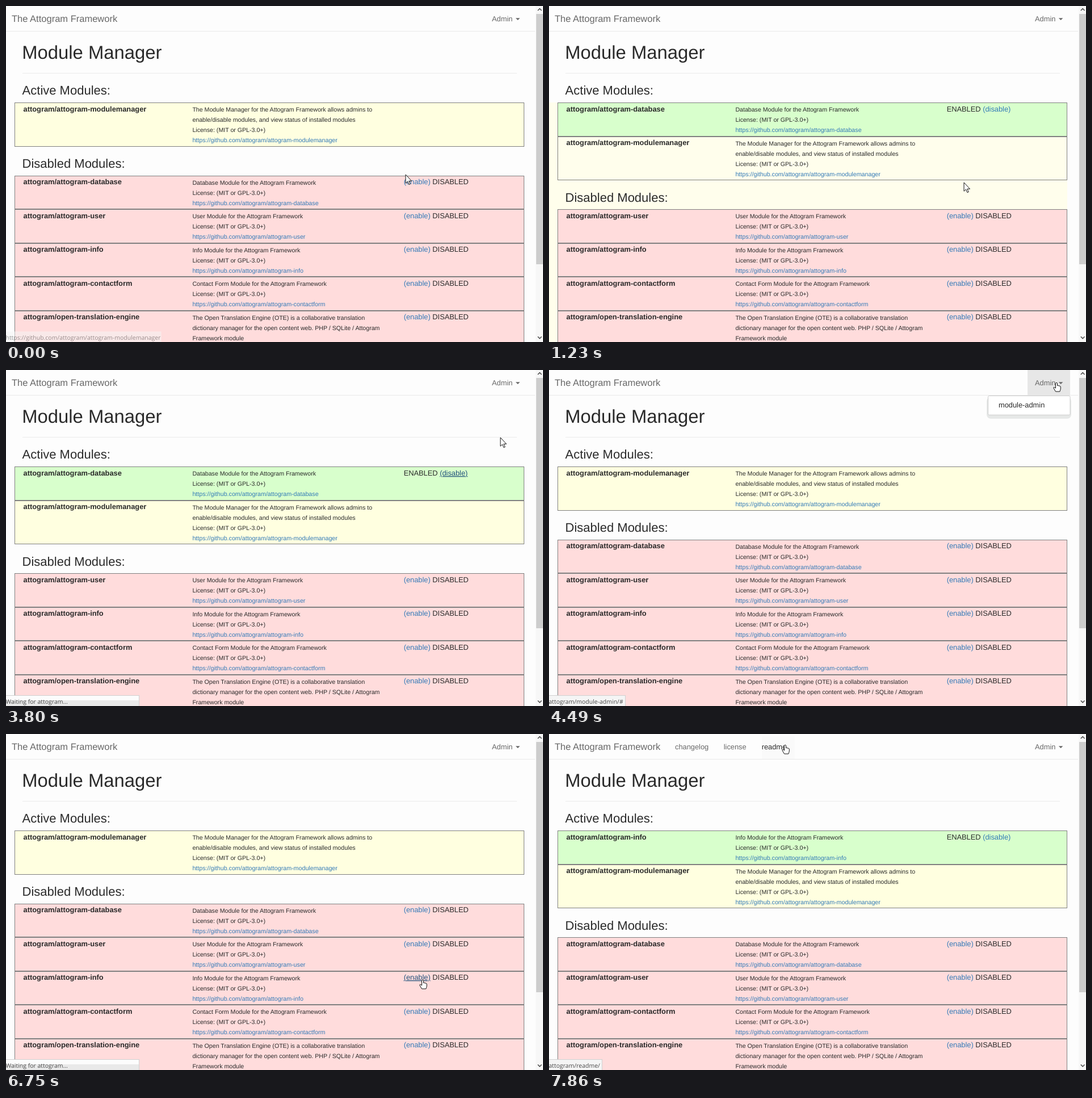
Recreate the animation shown at these times as an HTML page. Size 946 by 592 pixels, loop 8000 ms.

```html
<!DOCTYPE html>
<html lang="en">
<head>
<meta charset="utf-8">
<title>Module Manager</title>
<style>
html, body { margin: 0; width: 100%; height: 100%; overflow: hidden; background: #fdfdfd; }
svg { display: block; width: 946px; height: 592px; }
text { font: 12.83px "Liberation Sans", Arial, sans-serif; fill: #2a2a2a; text-rendering: geometricPrecision; white-space: pre; }
.h1 { font-size: 32.8px; }
.h3 { font-size: 22px; }
.brand { font-size: 16.5px; fill: #686868; }
.nav { fill: #686868; }
.name { font-weight: bold; }
.desc { font-size: 10.62px; }
.url { font-size: 10.7px; fill: #337ab7; }
.link { fill: #337ab7; }
.hover { fill: #23527c; text-decoration: underline; }
.status { font: 10.47px "Open Sans", "Noto Sans", sans-serif; fill: #484848; }
</style>
</head>
<body>
<svg id="stage" viewBox="0 0 946 592"></svg>
<script>
const LOOP = 8000;
const stage = document.getElementById('stage');

// Baselines sit on whole pixels.
const text = (x, y, cls, content) => `<text x="${x}" y="${Math.round(y)}" class="${cls}">${content}</text>`;
const rect = (x, y, w, h, fill, more = '') =>
  `<rect x="${x}" y="${y}" width="${w}" height="${h}" fill="${fill}" ${more}/>`;
const path = (d, more) => `<path d="${d}" ${more}/>`;

const about = title => [`${title} Module for the Attogram Framework`];
const modules = {
  database: { lines: about('Database') },
  user: { lines: about('User') },
  info: { lines: about('Info') },
  contactform: { lines: about('Contact Form') },
  modulemanager: { lines: [
    'The Module Manager for the Attogram Framework allows admins to',
    'enable/disable modules, and view status of installed modules'] },
  ote: { name: 'attogram/open-translation-engine', lines: [
    'The Open Translation Engine (OTE) is a collaborative translation',
    'dictionary manager for the open content web. PHP / SQLite / Attogram',
    'Framework module'] }
};
const optional = ['database', 'user', 'info', 'contactform', 'ote'];

const rowHeight = id => 59.5 + (modules[id].lines.length - 1) * 18;

function row(id, y, fill, state) {
  const { name = 'attogram/attogram-' + id, lines } = modules[id];
  const desc = [...lines, 'License: (MIT or GPL-3.0+)'];
  const lineY = i => y + 15.8 + i * 18.15;
  const top = Math.round(y), bottom = Math.round(y + rowHeight(id));
  return rect(15.5, top + 0.5, 897, bottom - top - 1, fill, 'stroke="#808080"') +
    text(30.6, y + 15.7, 'name', name) +
    desc.map((line, i) => text(328.4, lineY(i), 'desc', line)).join('') +
    text(328.4, lineY(desc.length), 'url', 'https://github.com/' + name) +
    text(700.7, y + 15.7, '', state);
}

function list(enabled, hover, tint) {
  const cls = id => hover === id ? 'hover' : 'link';
  let y = 170.2, out = '';
  const add = (id, fill, state) => { out += row(id, y, fill, state); y += rowHeight(id); };
  if (tint) out += rect(0, 170, 913, 422, '#fffeec');
  if (enabled) add(enabled, '#d8ffcc', `ENABLED <tspan class="${cls(enabled)}">(disable)</tspan>`);
  add('modulemanager', tint ? '#fffeec' : '#ffffe0', '');
  out += text(28.6, y + 37.5, 'h3', 'Disabled Modules:');
  y += 51;
  for (const id of optional)
    if (id !== enabled) add(id, '#ffdcdc', `<tspan class="${cls(id)}">(enable)</tspan> DISABLED`);
  return out;
}

function menu(enabled, hoverItem) {
  const items = enabled === 'database' ? ['db-admin', 'db-tables', 'events', 'module-admin'] : ['module-admin'];
  const h = 10 + items.length * 23.7;
  return rect(771, 48, 149, h + 4, '#e6e8e7', 'rx="7"') +
    rect(773.5, 45.5, 144.5, h, '#fff', 'stroke="#ccc" rx="2"') +
    (hoverItem >= 0 ? rect(774, 50 + hoverItem * 23.7, 143.5, 23.7, '#f8f8f8') : '') +
    items.map((item, i) => text(792, 66.3 + i * 23.7, '', item)).join('');
}

function header(enabled, open, navHover) {
  const links = enabled === 'info' ? [[222, 'changelog'], [307.7, 'license'], [374.7, 'readme']] : [];
  return rect(0, 44, 932, 1, '#e9e9e9') +
    (open ? rect(843, 0, 75, 45, '#e7e7e7') : '') +
    (navHover ? rect(375, 4, 58, 40, '#fafafa') : '') +
    text(10, 28, 'brand', 'The Attogram Framework') +
    links.map(([x, s]) => text(x, 27, s === navHover ? '' : 'nav', s)).join('') +
    text(856, 27, 'nav', 'Admin') +
    path('M897.8 21.2h7.6l-3.8 3.8z', 'fill="#686868"') +
    text(28.3, 93, 'h1', 'Module Manager') +
    rect(29, 118, 871, 1, '#ececec') +
    text(28.6, 156, 'h3', 'Active Modules:');
}

const scrollbar = rect(933, 0, 13, 592, '#f7f7f7') + rect(934, 14, 12, 441, '#cdcdcd') +
  path('M936.8 8l3.4-3.4 3.4 3.4M936.8 582.5l3.4 3.4 3.4-3.4', 'fill="none" stroke="#505050" stroke-width="1.5"');

const MODULE_URL = 'https://github.com/attogram/attogram-modulemanager';
const ADMIN = 'attogram/module-admin/#', WAIT = 'Waiting for attogram...';
const statusWidth = { [MODULE_URL]: 274, [ADMIN]: 135, [WAIT]: 235, 'attogram/readme/': 94 };

function statusBar(label) {
  if (!label) return '';
  const w = statusWidth[label], fading = label === MODULE_URL;
  return `<g opacity="${fading ? 0.55 : 1}">` +
    rect(-1, 573.5, w + 0.5, 20, '#f5f5f5', fading ? '' : 'stroke="#d0d0d0"') +
    (label === WAIT ? rect(0, 574, w - 1, 8, '#fcfcfc') + rect(0, 582, w - 1, 10, '#e9e9e9') : '') +
    text(-0.5, 587.5, 'status', label) + '</g>';
}

const shapes = {
  arrow: 'M0 0V15.3L3.5 12.1 5.9 17.6 8.2 16.6 5.8 11.3H10.5Z',
  hand: 'M-1.5 10V1.2Q0-.8 1.5 1.2V5.5Q2.8 4.6 4 6 5.3 5.2 6 6.6 7.3 6.2 7.3 7.8V11Q7 13 5.8 16H-1.5L-5 10Q-5.4 7.8-3.6 8.4Z'
};
const cursor = (shape, x, y) => path(shapes[shape],
  `transform="translate(${x} ${y})" fill="#fff" stroke="#111" stroke-linejoin="round"`);

// Time, cursor shape, x, y, then whatever changes from the step before.
const steps = [
  [0, 'arrow', 704, 297, { status: MODULE_URL }],
  [120, 'arrow', 708, 293, { status: '' }],
  [260, 'hand', 715, 303, { hover: 'database' }],
  [400, 'hand', 721, 306],
  [540, 'hand', 727, 309],
  [680, 'hand', 731, 310],
  [960, 'hand', 731, 311, { status: WAIT }],
  [1110, 'arrow', 731, 311, { enabled: 'database', hover: '', status: '', tint: true }],
  [1230, 'arrow', 731, 311],
  [1480, 'arrow', 752, 270, { tint: false }],
  [1620, 'arrow', 797, 165],
  [1760, 'arrow', 850, 70],
  [1900, 'hand', 881, 21, { status: ADMIN }],
  [2020, 'hand', 883, 20, { open: true }],
  [2170, 'hand', 883, 21],
  [2730, 'hand', 780, 59, { item: 0 }],
  [2870, 'hand', 783, 82, { item: 1 }],
  [3000, 'hand', 786, 106, { item: 2 }],
  [3140, 'hand', 789, 129, { item: 3 }],
  [3270, 'arrow', 789, 158, { open: false, item: -1, status: '' }],
  [3410, 'hand', 788, 178, { hover: 'database' }],
  [3550, 'hand', 788, 179, { status: WAIT }],
  [3680, 'arrow', 820, 160],
  [3800, 'arrow', 871, 119],
  [3940, 'arrow', 888, 70, { enabled: '', hover: '', status: '' }],
  [4080, 'hand', 894, 32, { status: ADMIN }],
  [4220, 'hand', 894, 24],
  [4350, 'hand', 894, 22, { open: true }],
  [4490, 'hand', 894, 22],
  [4890, 'hand', 888, 30],
  [5020, 'hand', 872, 50, { item: 0 }],
  [5150, 'hand', 856, 58],
  [5280, 'hand', 846, 60],
  [5410, 'hand', 840, 61],
  [5540, 'hand', 832, 62],
  [5680, 'arrow', 822, 100, { item: -1 }],
  [5810, 'arrow', 808, 150, { open: false, status: '' }],
  [5940, 'arrow', 790, 220],
  [6080, 'arrow', 772, 290],
  [6210, 'arrow', 755, 350],
  [6350, 'arrow', 743, 400],
  [6480, 'hand', 736, 427, { hover: 'info' }],
  [6610, 'hand', 734, 433],
  [6750, 'hand', 734, 433, { status: WAIT }],
  [6880, 'arrow', 732, 430, { enabled: 'info', hover: '', status: '' }],
  [7030, 'arrow', 690, 390],
  [7170, 'arrow', 610, 300],
  [7310, 'arrow', 530, 200],
  [7450, 'arrow', 465, 110],
  [7590, 'arrow', 430, 55],
  [7720, 'hand', 418, 26, { navHover: 'readme', status: 'attogram/readme/' }],
  [7860, 'hand', 416, 19]
];

let state = { enabled: '', hover: '', tint: false, open: false, item: -1, navHover: '', status: '' };
const scenes = steps.map(([time, shape, x, y, change]) => {
  state = { ...state, ...change };
  const { enabled, hover, tint, open, item, navHover, status } = state;
  const markup = rect(0, 0, 946, 592, '#fdfdfd') + list(enabled, hover, tint) +
    header(enabled, open, navHover) + (open ? menu(enabled, item) : '') +
    scrollbar + statusBar(status) + cursor(shape, x, y);
  return { time, markup };
});

let shown;
function draw() {
  const t = performance.now() % LOOP;
  const scene = scenes.findLast(s => s.time <= t);
  if (scene !== shown) stage.innerHTML = scene.markup;
  shown = scene;
  requestAnimationFrame(draw);
}
draw();
</script>
</body>
</html>
```
